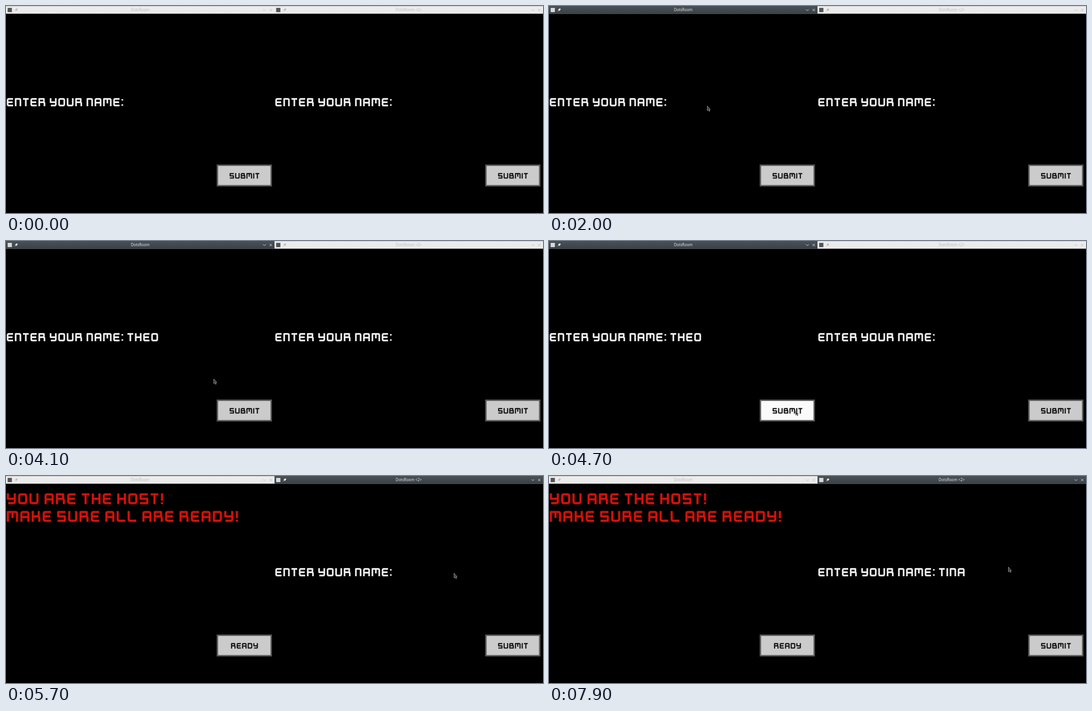
Recreate the animation shown at these times as an HTML page. Size 1138 by 440 pixels, loop 8 s.

```html
<!DOCTYPE html>
<html lang="en">
<head>
<meta charset="utf-8">
<title>DotsRoom</title>
<style>
html, body { margin: 0; width: 100%; height: 100%; overflow: hidden; background: #000; }
svg { display: block; }
.bar text { font: 8px "Noto Sans", "Open Sans", sans-serif; text-anchor: middle; }
.glyphs path { fill: none; stroke: currentColor; stroke-linejoin: round; }
.glyphs .soft { stroke-width: 4.6; opacity: .35; }
.glyphs .core { stroke-width: 2.8; }
</style>
</head>
<body>
<svg id="stage" width="1138" height="440" viewBox="0 0 1138 440">
  <defs>
    <linearGradient id="dark" x2="0" y2="1">
      <stop offset="0" stop-color="#4a5157"/><stop offset="1" stop-color="#3a4147"/>
    </linearGradient>
    <linearGradient id="light" x2="0" y2="1">
      <stop offset="0" stop-color="#b4b4b4"/><stop offset=".1" stop-color="#ededed"/>
      <stop offset="1" stop-color="#e9e9e9"/>
    </linearGradient>
  </defs>
  <rect width="1138" height="440"/>
</svg>
<script>
const NS = 'http://www.w3.org/2000/svg';
const LOOP = 8000, STEP = 100, PANE = 569;
const stage = document.getElementById('stage');

function add(parent, tag, attrs = {}, text) {
  const el = document.createElementNS(NS, tag);
  for (const key in attrs) el.setAttribute(key, attrs[key]);
  if (text) el.textContent = text;
  parent.appendChild(el);
  return el;
}

// Square display lettering: width and centre line, cap height 17.
const GAP = 4, SPACE = 6;
const GLYPHS = {
  A: [14, 'M1.5 17V4Q1.5 1.5 4 1.5H10Q12.5 1.5 12.5 4V17M1.5 9.5H12.5'],
  B: [14, 'M1.5 1.5H10.8V8M1.5 1.5V15.5H12.5V8H1.5'],
  D: [14, 'M1.5 1.5H10Q12.5 1.5 12.5 4V13Q12.5 15.5 10 15.5H1.5Z'],
  E: [13, 'M13 1.5H4Q1.5 1.5 1.5 4V13Q1.5 15.5 4 15.5H13M1.5 8.5H12'],
  H: [13.5, 'M1.5 0V17M12 0V17M1.5 8.5H12'],
  I: [3, 'M1.5 0V17'],
  K: [13.5, 'M1.5 0V17M11 0V8.5M1.5 8.5H9.5Q12 8.5 12 11V17'],
  L: [13.5, 'M1.5 0V13Q1.5 15.5 4 15.5H13.5'],
  M: [17.5, 'M1.5 17V1.5H13.5Q16 1.5 16 4V17M8.8 1.5V11'],
  N: [13, 'M1.5 17V1.5H9Q11.5 1.5 11.5 4V17'],
  O: [14, 'M4 1.5H10Q12.5 1.5 12.5 4V13Q12.5 15.5 10 15.5H4Q1.5 15.5 1.5 13V4Q1.5 1.5 4 1.5Z'],
  R: [14, 'M1.5 17V1.5H11.3V8.5M1.5 8.5H10Q12.5 8.5 12.5 11V17'],
  S: [13.5, 'M13 1.5H1.5V8.5H12V15.5H.5'],
  T: [12, 'M0 1.5H12M6 1.5V17'],
  U: [14, 'M1.5 0V13Q1.5 15.5 4 15.5H10Q12.5 15.5 12.5 13V0'],
  Y: [14, 'M1.5 0V8.5H12.5M12.5 0V13Q12.5 15.5 10 15.5H2'],
  ':': [4, 'M2 2V5M2 13V16'],
  '!': [4, 'M2 0V11.5M2 14V17'],
};

// Returns one group per character, so that words can be typed.
function lettering(parent, str, x, y, scale, color) {
  const line = add(parent, 'g', {
    class: 'glyphs', color, role: 'img', 'aria-label': str,
    transform: `translate(${x} ${y}) scale(${scale})`
  });
  let pen = 0;
  return [...str].map(ch => {
    const cell = add(line, 'g', { transform: `translate(${pen} 0)` });
    if (ch === ' ') { pen += SPACE; return cell; }
    const [width, d] = GLYPHS[ch];
    add(cell, 'path', { d, class: 'soft' });
    add(cell, 'path', { d, class: 'core' });
    pen += width + GAP;
    return cell;
  });
}

function titleBar(parent, title, fill, ink, icon) {
  const g = add(parent, 'g', { class: 'bar' });
  add(g, 'rect', { width: PANE, height: 16.4, fill });
  add(g, 'rect', { x: 3.5, y: 4, width: 9, height: 9, fill: icon });
  add(g, 'path', { d: 'M18 11.5L20.5 9M19.5 7.8L22 10.3L24.6 6.8L23 5.2Z', fill: ink, stroke: ink, 'stroke-width': .8 });
  add(g, 'text', { x: 284.5, y: 11.2, fill: ink }, title);
  add(g, 'path', { d: 'M544.5 7L547.5 10L550.5 7M558.5 6L563.5 11M563.5 6L558.5 11', fill: 'none', stroke: ink });
  return g;
}

function pane(x, title) {
  const root = add(stage, 'g', { transform: `translate(${x} 0)` });
  titleBar(root, title, 'url(#light)', '#bdbdbd', '#555');
  const active = titleBar(root, title, 'url(#dark)', '#e6e8ea', '#d8d8d8');
  const form = add(root, 'g');
  lettering(form, 'ENTER YOUR NAME:', 2, 196, 1, '#f4f4f4');
  const face = add(root, 'rect', {
    x: 448, y: 338.5, width: 114, height: 43.5,
    fill: '#cbcbcb', stroke: '#5c5c5c', 'stroke-width': 3
  });
  const submit = add(root, 'g');
  lettering(submit, 'SUBMIT', 474, 355.3, 2 / 3, '#0a0a0a');
  return { root, active, form, face, submit };
}

const left = pane(0, 'DotsRoom');
const right = pane(PANE, 'DotsRoom <2>');
const leftName = lettering(left.form, 'THEO', 257.5, 196, 1, '#f4f4f4');
const rightName = lettering(right.form, 'TINA', 257.5, 196, 1, '#f4f4f4');
const lobby = add(left.root, 'g');
lettering(lobby, 'YOU ARE THE HOST!', 2, 37, 4 / 3, '#d8120b');
lettering(lobby, 'MAKE SURE ALL ARE READY!', 2, 74.5, 4 / 3, '#d8120b');
lettering(lobby, 'READY', 477, 355.3, 2 / 3, '#0a0a0a');
const pointer = add(stage, 'path', {
  d: 'M.5 .5V10.6L2.8 8.7L4.3 12L6 11.2L4.6 8H7Z',
  fill: '#3a3a3a', stroke: '#a2a2a2', 'stroke-width': .9
});

// Pointer stops: time, x, y.
const ROUTE = [
  [700, 452, 404], [1500, 345, 227], [2000, 335, 212], [2400, 269, 153],
  [2800, 262, 147], [3600, 262, 147], [4400, 522, 360], [4800, 522, 360],
  [5300, 952, 212], [5600, 952, 212], [6200, 912, 133], [6500, 909, 124],
  [7300, 909, 124], [7600, 960, 172], [7700, 960, 172], [7900, 973, 193]
];
const LEFT_KEYS = [3000, 3000, 3200, 3300];
const RIGHT_KEYS = [6600, 6800, 7000, 7100];
const JOIN = 4900;

const clamp = v => Math.max(0, Math.min(1, v));
const fade = (t, start) => clamp((t - start + STEP) / 300);
const show = (el, on) => el.setAttribute('visibility', on ? 'inherit' : 'hidden');

function pointerAt(t) {
  const i = ROUTE.findIndex(p => p[0] > t);
  if (i < 0) return ROUTE[ROUTE.length - 1].slice(1);
  const [t0, x0, y0] = ROUTE[Math.max(0, i - 1)];
  const [t1, x1, y1] = ROUTE[i];
  const u = clamp((t - t0) / (t1 - t0 || 1));
  const k = u * u * (3 - 2 * u);
  return [x0 + (x1 - x0) * k, y0 + (y1 - y0) * k];
}

function draw(t) {
  const [x, y] = pointerAt(t);
  const joined = t >= JOIN;
  const hover = x > 447 && x < 564 && y > 337 && y < 384;
  show(pointer, t >= 700);
  pointer.setAttribute('transform', `translate(${x} ${y})`);
  left.active.setAttribute('opacity', fade(t, 1500) - fade(t, 5500));
  right.active.setAttribute('opacity', fade(t, 5500));
  left.face.setAttribute('fill', hover ? '#fafafa' : '#cbcbcb');
  show(left.form, !joined);
  show(left.submit, !joined);
  show(lobby, joined);
  leftName.forEach((cell, i) => show(cell, t >= LEFT_KEYS[i]));
  rightName.forEach((cell, i) => show(cell, t >= RIGHT_KEYS[i]));
}

const begin = performance.now();
function tick() {
  const t = (performance.now() - begin) % LOOP;
  draw(Math.floor(t / STEP) * STEP);
  requestAnimationFrame(tick);
}
tick();
</script>
</body>
</html>
```
